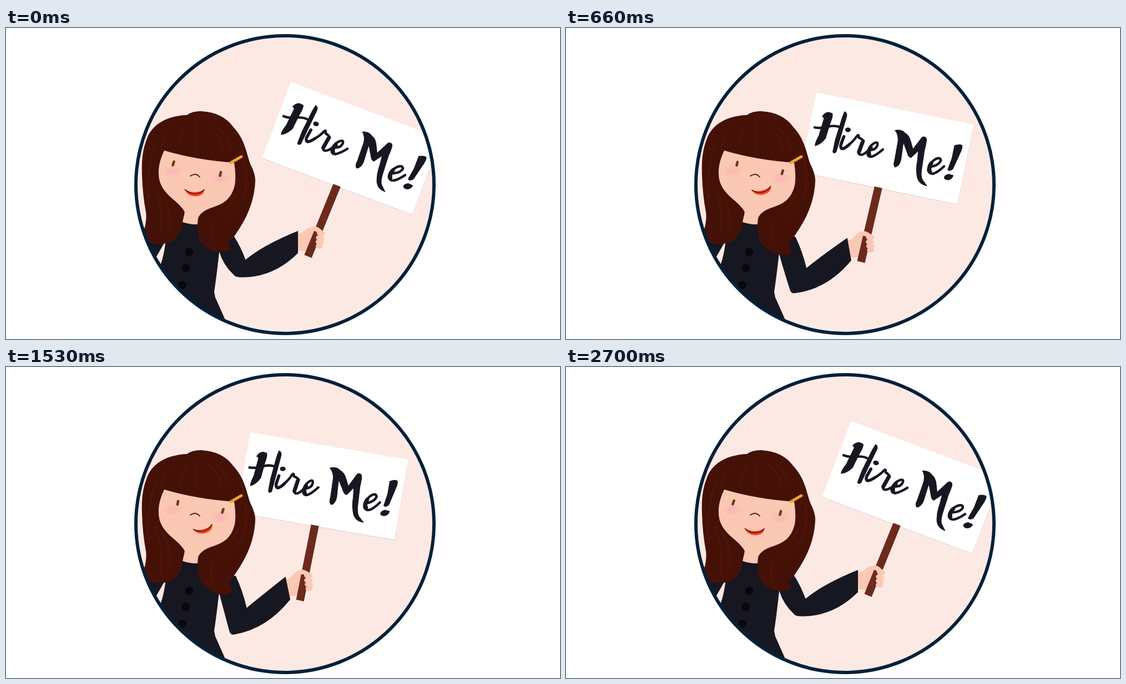
Recreate the animation shown at these times as an HTML page. Size 998 by 561 pixels, loop 2730 ms.

```html
<!DOCTYPE html>
<html lang="en">
<head>
<meta charset="utf-8">
<title>Hire Me!</title>
<style>
html, body { margin: 0; width: 100%; height: 100%; overflow: hidden; background: #fff; }
svg { display: block; width: 998px; height: 561px; }
.line { fill: none; stroke-linecap: round; stroke-linejoin: round; }
.skin { fill: #fbc8b4; }
.coat { fill: #161720; }
.hair { fill: #451107; }
.strands { stroke: #571b0c; stroke-width: 1; }
.ink { fill: #161720; stroke: #161720; stroke-width: 1.2; stroke-linejoin: round; }
.ink .line { fill: none; stroke-width: 4.4; }
.ink .bold { stroke-width: 7; }
.eyes { stroke: #6b400f; stroke-width: 4.6; }
</style>
</head>
<body>
<svg viewBox="0 0 998 561">
  <defs>
    <clipPath id="disc"><circle cx="502.500" cy="282.500" r="267"/></clipPath>
    <radialGradient id="blush">
      <stop offset=".35" stop-color="#fbb5b4" stop-opacity=".75"/>
      <stop offset="1" stop-color="#fbb5b4" stop-opacity="0"/>
    </radialGradient>
  </defs>
  <g clip-path="url(#disc)">
    <circle cx="502.500" cy="282.500" r="268" fill="#fde9e4"/>

    <g id="sign">
      <path class="skin" d="M498 388L512 383Q520 370 531 369L542 371L536 414L506 417Z"/>
      <g transform="translate(529 424) rotate(9.800)">
        <rect x="-139.500" y="-283" width="289" height="147" fill="#d9d2d0"/>
        <rect x="-140" y="-283.500" width="289" height="146.500" fill="#fff"/>
      </g>
      <path fill="#6b2a1d" d="M522 422.500L549 287L563 289.500L536 425.500Z"/>
      <path class="skin" d="M527 371Q531 367 537 369Q542 371 549 376Q546 383 539 382Q537 376 532 377Z"/>
      <g class="skin">
        <ellipse cx="544" cy="379" rx="7.500" ry="5"/>
        <ellipse cx="544" cy="387.500" rx="7.500" ry="5"/>
        <ellipse cx="545" cy="395" rx="7.500" ry="5"/>
        <ellipse cx="545.500" cy="402" rx="6.500" ry="4.500"/>
      </g>
      <g class="ink" role="img" aria-label="Hire Me!">
        <path d="M451 164Q455 157 462 156L469 158Q470 164 466 174L458 203Q450 214 440 217Q439 213 446 199L454 169Q455 165 451 164Z"/>
        <path class="line" d="M438 184Q450 186 462 182T486 183"/>
        <path d="M491 154Q496 156 495 162L485 200L478 227Q474 231 472 227L476 205L487 165Z"/>
        <path class="line" style="stroke-width:5.500" d="M491 199L486 214Q485 228 501 213"/>
        <ellipse cx="498" cy="186.500" rx="4.500" ry="3.500"/>
        <path class="line" d="M501 213Q510 205 514 198Q518 192 518 200Q524 202 527 206Q519 222 519 229Q524 235 536 222Q550 222 552 212Q553 205 546 209Q534 217 535 230Q539 241 562 220"/>
        <path class="line bold" d="M525 208L519 226M540 217Q535 224 538 231"/>
        <path d="M583 185Q593 182 600 188Q602 196 598 210L595 238Q592 250 585 251Q581 247 584 238L589 203Q589 191 583 185Z"/>
        <path d="M597 188Q608 190 612 205L616 218L632 196Q638 193 640 199Q640 206 637 218L633 252Q631 268 636 274L643 283Q630 281 626 270Q622 256 625 238L626 220L613 233Q608 232 606 224L598 204Z"/>
        <path class="line" d="M646 249Q664 246 667 236Q665 229 655 236Q643 246 645 256Q651 269 673 247"/>
        <path class="line bold" d="M650 242Q645 249 648 257"/>
        <path d="M691 209Q699 206 704 208Q706 212 700 225L689 251Q684 256 680 253L687 232Z"/>
        <path d="M674 267Q676 262 682 261L690 263Q688 270 681 271Q675 271 674 267Z"/>
      </g>
    </g>

    <path class="coat" d="M230 350L288 383L270 414L240 440ZM318 348Q332 354 345 353L390 380L384 405Q379 450 375 476L377 486L401 540L270 520L279 426Q286 404 288 380Z"/>
    <g fill="#08080a">
      <circle cx="330" cy="404" r="7.500"/><circle cx="324" cy="432.500" r="7.500"/><circle cx="317.500" cy="463.500" r="7.500"/>
    </g>
    <path class="coat" id="arm"/>
    <path class="hair" id="hair"/>
    <path class="line strands" d="M272 205Q252 245 257 320M283 300Q298 325 294 365M270 290Q284 330 278 372M302 172Q286 188 279 213M326 175Q316 190 313 214M345 166Q338 190 345 222M360 172Q382 185 391 222M376 174Q400 192 405 221M419 200Q438 245 430 305M418 292Q408 322 380 342Q364 358 372 389M428 300Q417 332 392 351"/>
    <path class="skin" d="M285 221Q342 238 411 243Q415 268 412 284C405 311 390 317 374 323Q351 330 346 343L345 354Q332 355 318 350L322 333Q320 325 301 309C281 292 275 278 275 262Q274 244 285 221Z"/>
    <ellipse cx="301" cy="257.500" rx="18" ry="11" fill="url(#blush)"/>
    <ellipse cx="386" cy="271" rx="17" ry="12" fill="url(#blush)"/>
    <path class="line" stroke="#e6a42e" stroke-width="5" d="M405 243L424 232"/>
    <path class="line" stroke="#5c2116" stroke-width="1.800" d="M332 267Q342 260 349 269"/>
    <path class="line eyes" id="eyes"/>
    <g id="mouth">
      <path fill="#f2421f" d="M321.500 290Q329 296 340 296Q351 296 357.500 290.500Q357 303 341 303.500Q326 303 321.500 290Z"/>
      <path class="line" stroke="#54100b" stroke-width="1.500" d="M322.500 291.500Q330 299 341 299Q352 298 357 291.500"/>
    </g>
  </g>
  <circle cx="502.500" cy="282.500" r="268.500" fill="none" stroke="#03203a" stroke-width="6"/>
</svg>
<script>
const LOOP = 2730;
const el = id => document.getElementById(id);
const lerp = (a, b, t) => a + (b - a) * t;

// Blend two paths that share the same commands
const mix = (from, to, t) => {
  const ends = to.match(/-?[\d.]+/g);
  let i = 0;
  return from.replace(/-?[\d.]+/g, n => lerp(+n, +ends[i++], t).toFixed(2));
};

// Sine ease from 0 to 1 between two times
const ease = (t, start, end) => {
  const u = Math.min(1, Math.max(0, (t - start) / (end - start)));
  return (1 - Math.cos(Math.PI * u)) / 2;
};

const arm = {
  out: 'M384 402L398 374L411 376Q423 395 431.5 418Q464 391 526 366L526 406Q480 452 420 449.500Q413 449 410 445Q391 427 384 403Z',
  near: 'M384 408L398 374L414 377Q427 406 433.5 436Q462 413 503 381L511.5 422Q469 475 411 484Q405 485 403 480Q391 435 384 408Z',
  raised: 'M384 407L398 374L414 377Q427 404 433.5 432Q462 408 504.5 374L513 415Q471 469 412 480.500Q406 482 403 477Q391 434 384 407Z'
};
const hairTop = 'M326 157Q335 150 351 150Q390 152 409 178C430 200 433 225 440 245Q450 265 449 277C447 320 428 352 411 376';
const hairLeft = 'L346 341L322 333L319 348Q316 372 300 384Q285 392 265 389Q252 386 249 364Q254 345 252 332Q246 300 245 265C244 240 246 220 253 202C262 173 292 158 326 157Z';
const hair = {
  out: hairTop + 'Q404 384 399 386Q401 391 406 396Q403 404 393 403Q378 406 367 399Q350 391 347 375Q342 355 346 341' + hairLeft,
  near: hairTop + 'Q406 384 401 387Q404 394 407 403Q403 413 393 411Q376 411 367 401Q350 392 347 375Q342 355 346 341' + hairLeft
};
const eyes = {
  out: 'M302.500 241L300.500 247.500M387 260L385.500 266.500',
  near: 'M310 242L309 248M391.500 256.500L389.500 262.500'
};

function draw() {
  const t = performance.now() % LOOP;
  const near = ease(t, 0, 900) - ease(t, 2100, 2700);
  const bob = ease(t, 990, 1335) - ease(t, 1335, 1680);

  const x = lerp(544, 529, near) + 1.6 * bob;
  const y = lerp(412, 424, near) - 7 * bob;
  el('sign').setAttribute('transform',
    `translate(${x} ${y}) rotate(${lerp(10.9, 0, near)}) translate(-529 -424)`);
  el('mouth').setAttribute('transform',
    `translate(${14.5 * near} ${-3 * near}) rotate(${-15 * near} 339.500 291.500)`);
  el('arm').setAttribute('d', mix(mix(arm.out, arm.near, near), arm.raised, bob));
  el('hair').setAttribute('d', mix(hair.out, hair.near, near));
  el('eyes').setAttribute('d', mix(eyes.out, eyes.near, near));
  requestAnimationFrame(draw);
}
draw();
</script>
</body>
</html>
```
